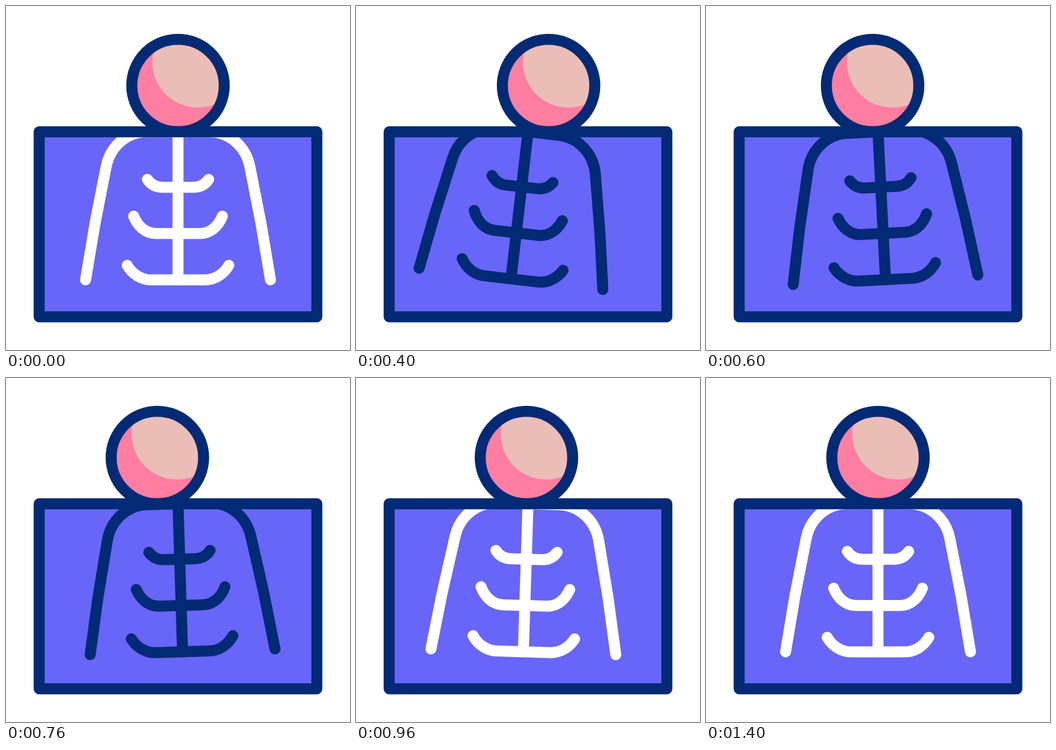
These frames come from a looping animation (640x640 px, 2 s). An HTML page:

```html
<!DOCTYPE html>
<html lang="en">
<head>
<meta charset="utf-8">
<title>X-ray</title>
<style>
  html, body { margin: 0; width: 100%; height: 100%; overflow: hidden; background: #fff; }
  svg { display: block; width: 100%; height: 100%; }
  .line { fill: none; stroke: #032a75; stroke-width: 20.5; stroke-linecap: round; stroke-linejoin: round; }
</style>
</head>
<body>
<svg viewBox="0 0 640 640">
  <clipPath id="face"><circle cx="320" cy="148" r="80"/></clipPath>
  <clipPath id="plate"><rect x="61" y="234" width="518" height="344"/></clipPath>
  <g id="head">
    <circle cx="320" cy="148" r="80" fill="#ff7ea1"/>
    <circle cx="357" cy="104" r="85" fill="#ebbdb7" clip-path="url(#face)"/>
    <circle class="line" cx="320" cy="148" r="86"/>
  </g>
  <rect x="61.7" y="234" width="516.6" height="344.3" fill="#6865f9"/>
  <g clip-path="url(#plate)">
    <g id="bones" class="line">
      <path d="M320 234V509.5"/>
      <path d="M148 509.5L165.5 405L186.5 298C194 261 225 234 262 234H378C415 234 446 261 453.5 298L474.5 405L492 509.5"/>
      <path d="M263 322.5C270 333 280 337.2 291 337.2H349C360 337.2 370 333 377 322.5"/>
      <path d="M237.5 391C245 410 260 423.3 279 423.3H361C380 423.3 395 410 402.5 391"/>
      <path d="M225.5 482.5C235 499 252 509.5 270 509.5H370C388 509.5 405 499 414.5 482.5"/>
    </g>
  </g>
  <rect class="line" x="61.7" y="234" width="516.6" height="344.3"/>
</svg>
<script>
  const LOOP = 2000, STEP = 40;
  const head = document.getElementById('head');
  const bones = document.getElementById('bones');

  // [time in ms, value]
  const headShift = [[63, 0], [355, 38.6], [798, -38.6], [1019, 0]];
  const bodyTilt = [[49, 0], [342, 6.9], [631, -2.95], [961, 1.8], [1400, 0]];

  function ease(x) {
    const a = x ** 2.5, b = (1 - x) ** 2.5;
    return a / (a + b);
  }

  function valueAt(keys, t) {
    if (t <= keys[0][0]) return keys[0][1];
    for (let i = 1; i < keys.length; i++) {
      const [t0, v0] = keys[i - 1], [t1, v1] = keys[i];
      if (t < t1) return v0 + (v1 - v0) * ease((t - t0) / (t1 - t0));
    }
    return keys[keys.length - 1][1];
  }

  function draw(now) {
    const t = Math.floor((now % LOOP) / STEP) * STEP;
    const dark = t >= 300 && t < 860;
    head.setAttribute('transform', `translate(${valueAt(headShift, t)} 0)`);
    bones.setAttribute('transform', `rotate(${valueAt(bodyTilt, t)} 320 234)`);
    bones.style.stroke = dark ? '#032a75' : '#fff';
  }

  const start = performance.now();
  function tick() {
    draw(performance.now() - start);
    requestAnimationFrame(tick);
  }
  tick();
</script>
</body>
</html>
```
